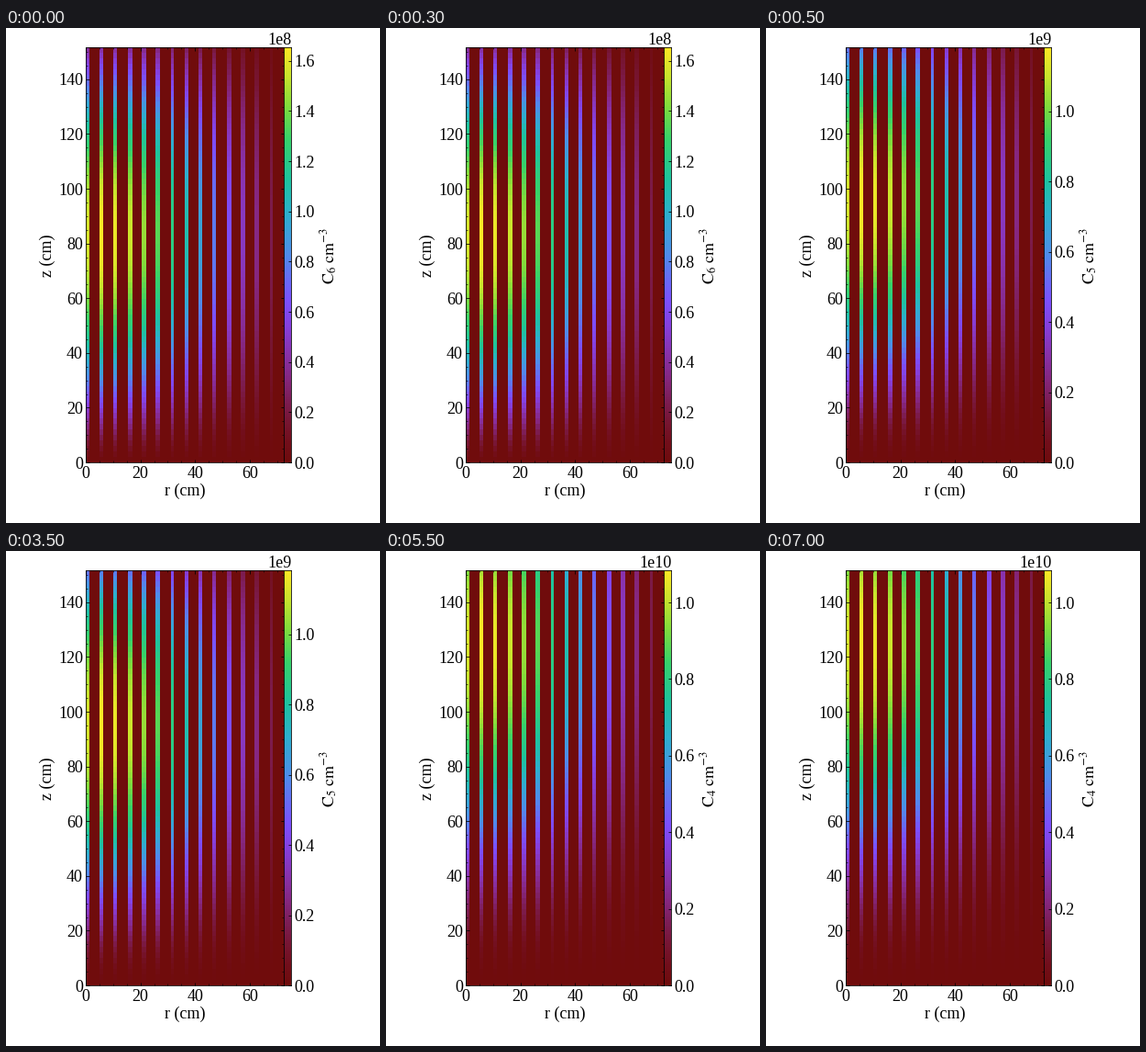
Write a matplotlib script that moves like this. It is 408 px wide and 539 px high and loops after 8000 ms.

```python
import numpy as np
import matplotlib.pyplot as plt
from matplotlib.animation import FuncAnimation
from matplotlib.colors import LinearSegmentedColormap
from matplotlib.ticker import AutoMinorLocator, MultipleLocator

W, H, DPI = 408, 539, 72
LEFT, RIGHT, TOP, BOTTOM = 87, 303, 21, 473
BAR_RIGHT = 311
SCALE = 2.98                       # pixels per cm
R_MAX, Z_MAX = (RIGHT - LEFT) / SCALE, (BOTTOM - TOP) / SCALE
STEP = 500                         # ms per frame

plt.rcParams.update({
    "font.family": "Liberation Serif",
    "font.size": 18,
    "mathtext.fontset": "stix",
    "axes.linewidth": 0.8,
})

CMAP = LinearSegmentedColormap.from_list("decay", [
    (0.00, "#700c0c"), (0.05, "#730f1c"), (0.10, "#781634"),
    (0.15, "#7e1e56"), (0.20, "#86277f"), (0.27, "#8a34b2"),
    (0.33, "#8640de"), (0.39, "#7c50ff"), (0.50, "#508ceb"),
    (0.60, "#2db0cd"), (0.68, "#1ec3a0"), (0.78, "#37d26a"),
    (0.86, "#82dc3c"), (0.93, "#c8e42d"), (1.00, "#fde725"),
], N=256)

# start ms, group, decay per cm, bar maximum, exponent
GROUPS = [
    (0, 6, 0.130, 1.654, 8),
    (500, 5, 0.047, 1.183, 9),
    (5500, 4, 0.0104, 1.084, 10),
]


def bessel0(x):
    theta = (np.arange(60) + 0.5) * np.pi / 60
    return np.cos(np.outer(x, np.sin(theta))).mean(axis=1)


def axial(decay, rows=76, margin=5):
    """Precursors carried upward from a sine-shaped source while decaying."""
    z = (np.arange(rows) + 0.5) * Z_MAX / rows
    k = np.pi / (Z_MAX + 2 * margin)
    p = k * margin

    def wave(s):
        return decay * np.sin(k * s + p) - k * np.cos(k * s + p)

    c = wave(z) - wave(0) * np.exp(-decay * z)
    return c / c.max()


def radial(cells=144, channels=14, width=2.8, offset=0.08):
    """Fuel channels, a few cells wide, separated by empty moderator."""
    pitch = cells / channels
    x = np.arange(cells) + 0.5
    n, inside = np.divmod(x + offset, pitch)
    r = n * pitch * R_MAX / cells
    row = np.where(inside < width, bessel0(2.405 * r / 84) ** 1.5, 0)
    row[n == 0] *= 0.94
    return row / row.max()


def add_axes(x0, x1):
    return fig.add_axes([x0 / W, 1 - BOTTOM / H, (x1 - x0) / W, (BOTTOM - TOP) / H])


def label(x, y, text, **kw):
    return fig.text(x / W, 1 - y / H, text, **kw)


fig = plt.figure(figsize=(W / DPI, H / DPI), dpi=DPI, facecolor="white")
centre = dict(ha="center", va="center")

ax = add_axes(LEFT, RIGHT)
ROW = radial()
FIELDS = [np.outer(axial(g[2]), ROW) for g in GROUPS]
field = ax.imshow(FIELDS[0], cmap=CMAP, vmin=0, vmax=1, origin="lower",
                  extent=[0, R_MAX, 0, Z_MAX], aspect="auto",
                  interpolation="nearest")
for axis in (ax.xaxis, ax.yaxis):
    axis.set_major_locator(MultipleLocator(20))
    axis.set_minor_locator(AutoMinorLocator(4))
ax.tick_params(which="both", direction="in", top=True, right=True)
ax.tick_params(axis="y", pad=3)

bar = add_axes(RIGHT, BAR_RIGHT)
ramp = bar.imshow(np.linspace(0, 1, 256)[:, None], cmap=CMAP, origin="lower",
                  extent=[0, 1, 0, 1], aspect="auto", interpolation="nearest")
bar.set_xticks([])
bar.yaxis.tick_right()
bar.yaxis.set_major_locator(MultipleLocator(0.2))
bar.yaxis.set_major_formatter("{x:.1f}")
bar.tick_params(direction="in")

label(195, 504, "r (cm)", **centre)
label(45.5, 248, "z (cm)", rotation=90, **centre)
unit = label(352.5, 248, "", rotation=90, **centre)
power = label(312, 17.5, "", ha="right", va="baseline")


def draw(i):
    n = max(j for j, g in enumerate(GROUPS) if g[0] <= i * STEP)
    _, group, _, top, exponent = GROUPS[n]
    field.set_data(FIELDS[n])
    ramp.set_extent([0, 1, 0, top])
    bar.set_ylim(0, top)
    unit.set_text(rf"$\mathrm{{C_{group}\ cm^{{-3}}}}$")
    power.set_text(f"1e{exponent}")
    return field, ramp, unit, power


anim = FuncAnimation(fig, draw, frames=16, interval=STEP, repeat=True,
                     repeat_delay=0, blit=False)
plt.show()
```
